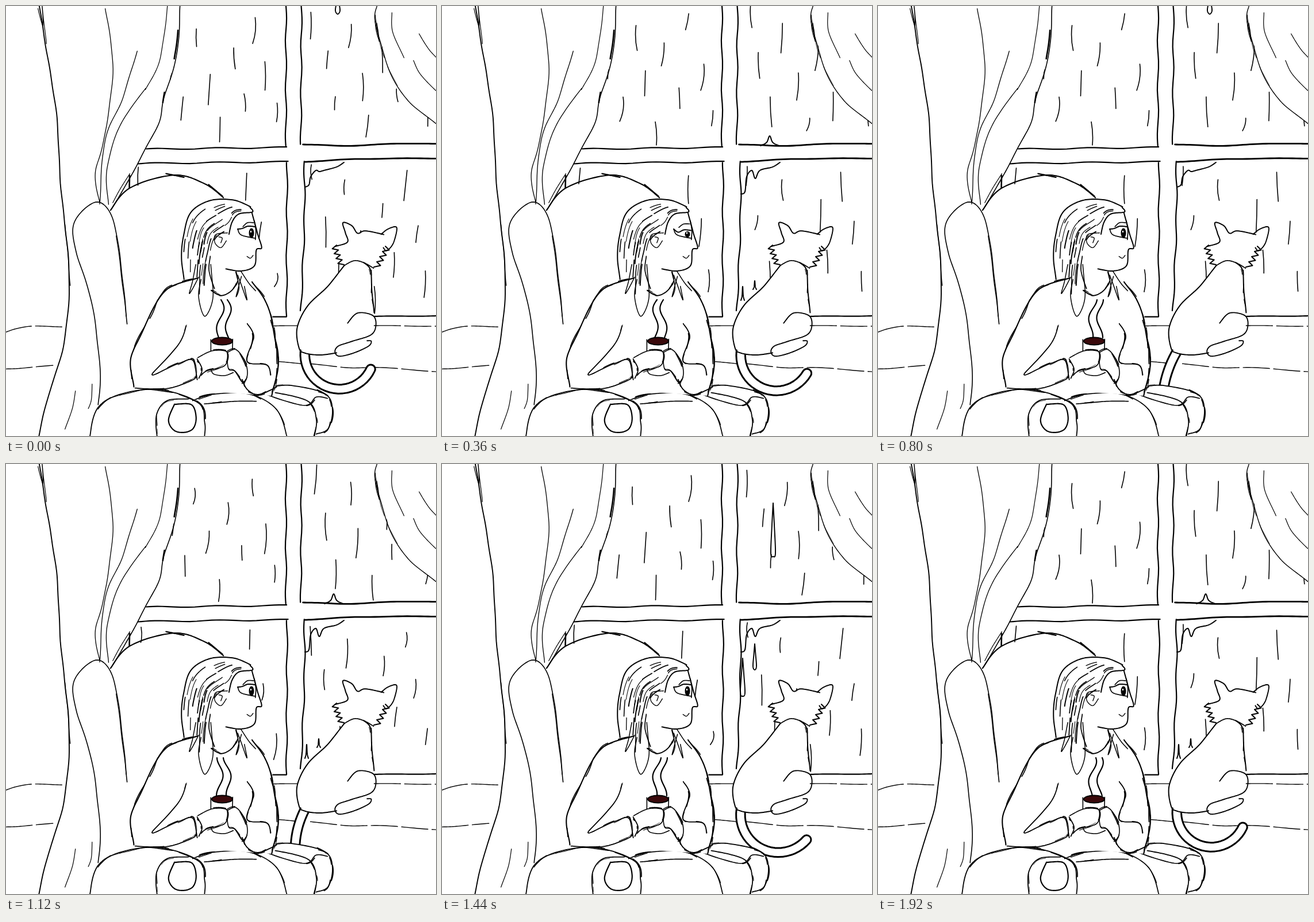
An HTML page with a canvas for the animation above (2 s loop, 748x748 px).

```html
<!DOCTYPE html>
<html lang="en">
<head>
<meta charset="utf-8">
<title>Rainy window</title>
<style>
html, body { margin: 0; width: 100%; height: 100%; overflow: hidden; background: #fff; }
canvas { display: block; }
</style>
</head>
<body>
<canvas id="stage" width="748" height="748"></canvas>
<script>
const SIZE = 748, LOOP = 2000, TAU = 2 * Math.PI;
const { sin, cos, floor, min, max } = Math;
const screen2d = document.getElementById('stage').getContext('2d');
let ctx = screen2d;

let seed = 7;
function rnd(lo = 0, hi = 1) {
  seed = (seed * 16807) % 2147483647;
  return lo + (hi - lo) * seed / 2147483647;
}

const points = s => s.trim().split(/\s+/).map(p => p.split(',').map(Number));
const mix = (a, b, f) => a + (b - a) * f;
const range = (n, f) => Array.from({ length: n }, (_, i) => f(i));

// Point at u (0 to 1) on a smooth curve through the key points.
function pointAt(p, u) {
  const n = p.length - 1, f = min(u * n, n - 1e-6), i = floor(f), t = f - i;
  const [a, b, c, d] = [-1, 0, 1, 2].map(k => p[max(0, min(n, i + k))]);
  return [0, 1].map(k => b[k] + t / 2 * (c[k] - a[k] + t * (2 * a[k] - 5 * b[k] + 4 * c[k] - d[k]
    + t * (3 * (b[k] - c[k]) + d[k] - a[k]))));
}

// Smooth path with a slow waver, like a hand-held pen.
function trace(p, wobble = 0, from = 0, to = 1) {
  const path = new Path2D(), steps = p.length * 12;
  const phase = wobble ? rnd(0, TAU) : 0;
  let run = 0, last;
  for (let i = 0; i <= steps; i++) {
    const [x, y] = pointAt(p, mix(from, to, i / steps));
    if (last) run += Math.hypot(x - last[0], y - last[1]);
    last = [x, y];
    path.lineTo(x + wobble * sin(run / 13 + phase), y + wobble * sin(run / 17 + 2 * phase));
  }
  return path;
}

function ink(path, width = 2) {
  ctx.lineWidth = width;
  ctx.stroke(path);
}

// Draws curves separated by "|"; loose adds short overlapping strokes.
function pen(s, width = 2, wobble = 0.4, loose = 0) {
  s.split('|').map(points).forEach(p => {
    ink(trace(p, wobble), width);
    for (let i = 0; i < loose * p.length; i++) {
      const from = rnd(0, 0.85);
      ink(trace(p, 1.6, from, from + rnd(0.06, 0.15)), rnd(0.8, 1.8));
    }
  });
}

function polygon(p) {
  const path = new Path2D();
  p.forEach(([x, y]) => path.lineTo(x, y));
  return path;
}

function mask(s) {
  ctx.fillStyle = '#fff';
  ctx.fill(polygon(points(s)));
}

function setInk() {
  ctx.strokeStyle = '#000';
  ctx.lineCap = ctx.lineJoin = 'round';
}

function layer(paint) {
  const canvas = document.createElement('canvas');
  canvas.width = canvas.height = SIZE;
  ctx = canvas.getContext('2d');
  setInk();
  paint();
  ctx = screen2d;
  return canvas;
}

// --- Still parts ---

function drawWindow() {
  pen('487,0 487,242|514,0 513,240|243,249 487,246|228,274 490,271|489,272 488,540|519,270 519,380 513,530', 2.2, 1.1);
  pen('464,541 488,541|640,540 748,539', 2.2);
  pen('517,241 600,243 690,239 748,240|520,271 620,266 748,265', 2.8);
  ctx.setLineDash([46, 7]);
  pen('0,567 20,561 50,557 103,558|0,631 30,630 82,625|463,557 508,556|640,556 748,557', 1.4);
  pen('475,619 515,622|530,622 590,629 650,629 748,636', 1.4);
  ctx.setLineDash([]);
}

function drawCurtains() {
  const edge = '303,0 297,85 275,160 265,205 232,268 205,318 182,355';
  mask(`0,0 ${edge} 95,350 89,220 66,40`);
  pen(edge, 1.6);
  pen('299,42 296,70 293,92|276,150 273,168|215,295 215,318', 2.6);
  pen('58,0 70,75 88,190 95,310 110,470 100,590 73,680 57,748', 1.9);
  pen('173,5 186,110 170,235 155,290 163,342|228,78 203,160 172,235 163,345|243,143 200,205 176,280 178,345', 1.3);
  pen('281,0 268,92 243,145|56,4 64,35 63,0 70,66|103,380 112,486|186,342 200,316 215,292', 1.2);
  pen('150,658 148,685 143,700|121,670 115,700 103,736', 1.2);

  const drape = '645,0 643,30 668,115 700,165 748,205';
  mask(`${drape} 748,0`);
  pen(drape, 1.4, 0.4, 1);
  pen('671,12 673,45 692,90|719,48 735,75 748,90|709,95 720,118 748,147', 1.2);
}

// Zigzag of fur from the top point to the bottom one.
function fur(x0, y0, x1, y1, reach) {
  ink(polygon(range(9, i => [mix(x0, x1, i / 8) + (i % 2 ? reach : 0), mix(y0, y1, i / 8) - (i % 2 ? 0 : 2)])), 2);
}

function drawCat() {
  const back = '588,452 560,487 525,522 506,560 510,595 520,604 545,607 575,603';
  const chest = '622,446 634,460 637,500 640,533';
  mask(`${back} 640,540 637,475 622,446`);
  mask('586,377 612,395 657,398 680,386 662,425 640,455 588,452 573,418');
  pen(back, 2);
  pen(chest, 2, 0.4, 1);
  pen('588,452 605,443 622,446 640,456', 1.7);
  pen('594,552 612,534 638,538 643,556 634,573 600,584 578,591 572,601 580,609 605,604 630,592 635,583 628,582', 1.9);
  pen('573,418 594,411 590,395 586,377 602,382 612,395 625,391 657,398', 2);
  pen('652,397 665,388 680,386 674,412 662,425 656,420', 1.9);
  fur(575, 418, 588, 452, -9);
  fur(660, 420, 640, 456, 9);
}

function drawChair() {
  const back = '182,355 215,317 290,294 345,309 378,333';
  mask(`${back} 330,560 200,560`);
  mask('440,672 470,661 500,660 535,667 555,675 567,690 568,715 540,748 440,748');
  pen(back, 2.1);
  pen('278,292 310,298|352,311 377,331', 2.2);
  pen('160,694 164,640 150,520 123,430 118,378 155,341 182,362 196,420 211,553', 1.6);
  pen('192,400 201,470 209,540', 1.2);
  pen('325,687 360,675 420,675 470,700 488,748|345,692 390,688 435,688|415,673 430,668 515,695 540,680 560,682', 1.7, 0.5, 1);
  pen('470,661 500,660 555,675 568,700 560,735 540,745|468,673 525,687 540,720 537,748', 1.8, 0.5, 1);
  pen('146,748 160,698 205,674 265,667 335,690 346,725 345,748|263,748 262,710 280,687 318,683', 1.8, 0.5, 1);
  pen('293,693 322,693 331,715 326,735 310,742 292,738 283,720 293,693', 2.2);
}

function drawHair() {
  const outer = points('425,350 395,337 355,338 322,360 308,400 306,440 309,476');
  const inner = points('425,357 400,362 390,385 365,405 357,435 350,470 346,520');
  ink(trace(outer, 0.7), 2);
  for (let i = 0; i < 34; i++) {
    const depth = rnd(0.05, 1), from = rnd(0.04, 0.8);
    const strand = outer.map((p, k) => [mix(p[0], inner[k][0], depth), mix(p[1], inner[k][1], depth)]);
    ink(trace(strand, 0.5, from, min(1, from + rnd(0.08, 0.2))), rnd(1, 2));
  }
  pen('330,450 325,478 319,500 335,472|339,475 335,505 346,540 360,505 356,450|400,463 405,490 400,505 410,470', 1.5);
  pen('403,468 419,511 415,488|409,462 422,482 434,495', 1.5);
}

function drawWoman() {
  const left = '333,474 280,492 250,540 218,612 222,662';
  const right = '428,480 450,510 466,565 473,630 462,678';
  mask('309,476 306,430 322,360 355,338 395,335 428,360 441,410 445,420 432,452 410,461 405,480 340,500');
  mask(`222,662 218,612 250,540 280,492 333,474 428,480 450,510 466,565 473,630 462,678`);
  pen(`${left}|${right}`, 2.1, 0.7, 2);
  pen('313,556 300,590 254,641 300,622 325,616 333,650|333,614 341,632 335,648', 1.8, 0.5, 1);
  pen('225,664 280,666 325,650 331,640|420,553 430,575 420,618 453,625 460,642', 1.8, 0.6, 1);
  pen('410,650 420,668 440,676 470,662|357,495 375,503 392,495 403,478', 1.9, 0.7, 2);
  pen('333,612 360,600 385,602 380,625 350,635 340,643', 1.6, 0.5, 1);
  pen('385,602 400,598 416,618 420,640 412,655 398,635 388,632 385,615', 1.6, 0.5, 1);
  pen('356,580 356,600|394,580 394,598|357,632 362,640 380,643 395,638', 1.6);
  pen('428,360 437,395 445,420 436,424 432,452 410,461 383,457', 2);
  pen('425,350 429,358 405,362 393,376 388,397', 2);
  pen('419,436 425,439 430,434|385,395 365,398 364,412 374,420 383,408|370,402 376,404 374,412', 1.4);
  pen('355,435 353,460 363,492|400,462 403,475|403,388 409,398 434,404|432,374 435,390 434,406', 1.7);
  drawHair();
}

// --- Moving parts ---

function makeRain() {
  const path = new Path2D();
  const panes = [[264, 0, 480, 242], [225, 272, 482, 535], [525, 0, 745, 238], [525, 268, 745, 535]];
  for (const [x0, y0, x1, y1] of panes) {
    for (let i = 0; i < 11; i++) {
      const x = mix(x0, x1, (i + rnd(0.2, 0.8)) / 11);
      const y = mix(y0, y1, (i * 0.382 % 1) * 0.85) + rnd(0, 15);
      const end = min(y1, y + rnd(22, 58));
      path.moveTo(x, y);
      path.quadraticCurveTo(x + rnd(-3, 4), (y + end) / 2, x + rnd(-6, 3), end);
    }
  }
  return path;
}

function drop(x, top, bottom, w) {
  ink(trace([[x, top], [x + w / 2, mix(top, bottom, 0.4)], [x + w, bottom - 6], [x, bottom],
    [x - w, bottom - 6], [x - w / 2, mix(top, bottom, 0.4)], [x, top]]), 1.9);
}

function splash(x, y, w, h) {
  ink(trace([[x - w, y], [x - w / 3, y - h / 3], [x, y - h], [x + w / 3, y - h / 3], [x + w, y]]), 2);
}

function drawDrips(t) {
  const phase = floor(t / 80) % 5, sag = 4 * min(phase, 3);
  const gutter = [[520, 315 + sag], [527, 311 + sag], [530, 297], [539, 286], [545, 288 + sag], [553, 286], [575, 280], [588, 272]];
  ink(trace(gutter), 2);
  if (phase < 3) drop(577, -20, 14 + 26 * phase, 4);
  if (phase === 3) {
    drop(576, 68, 161, 4);
    drop(523, 338, 404, 4);
    drop(544, 313, 358, 3);
  }
  if (phase === 4) {
    splash(570, 243, 16, 17);
    splash(523, 512, 3, 24);
    splash(544, 493, 3, 15);
  }
}

// The tail uncurls and swings left, then curls back.
function drawTail(t) {
  const swing = t > 280 && t < 1580 ? sin(Math.PI * (t - 280) / 1300) ** 2 : 0;
  const start = 95 + 28 * swing, turn = 160 - 120 * swing, steps = 24;
  let x = 520, y = 601;
  const spine = range(steps + 1, i => {
    const p = [x, y], heading = (start - turn * (i + 0.5) / steps) * TAU / 360;
    x += cos(heading) * 168 / steps;
    y += sin(heading) * 168 / steps;
    return p;
  });
  const path = polygon(spine);
  ink(path, 18.5);
  ctx.strokeStyle = '#fff';
  ink(path, 12.5);
  ctx.strokeStyle = '#000';
}

function drawSteam(t) {
  const rise = 0.75 + floor(t / 76) / 8;
  for (const [base, lean] of [[370, 4], [387, -2]]) {
    ink(polygon(range(23, i => {
      const v = i / 22;
      return [base + lean * v + (4 + 3 * v) * cos(TAU * (v - rise)), 577 - 66 * v];
    })), 2.2);
  }
  const coffee = new Path2D();
  coffee.ellipse(376, 583, 18, 6.5, 0, 0, TAU);
  ctx.fillStyle = '#3a090b';
  ctx.fill(coffee);
  ink(coffee, 2);
}

function drawEye(t) {
  const shut = max(0, 1 - Math.abs(t - 420) / 100);
  const lid = y => y + 16 * shut;
  ink(trace([[403, 388], [411, lid(387)], [421, lid(383)], [433, lid(384)]]), 2);
  ink(trace([[412, 384 + 3 * shut], [420, 377 + 6 * shut], [431, 377 + 5 * shut]]), 1.6);
  ctx.fillStyle = '#000';
  ctx.beginPath();
  ctx.ellipse(427, 395 + 5 * shut, 4.5, 8 * (1 - shut) + 0.5, 0, 0, TAU);
  ctx.fill();
  ctx.fillStyle = '#fff';
  if (shut < 0.5) ctx.fillRect(425, 391 + 6 * shut, 2, 3);
}

const back = layer(drawWindow);
const front = layer(() => [drawCurtains, drawCat, drawChair, drawWoman].forEach(paint => paint()));
const rain = range(3, makeRain);

function draw(t) {
  ctx.fillStyle = '#fff';
  ctx.fillRect(0, 0, SIZE, SIZE);
  setInk();
  ctx.drawImage(back, 0, 0);
  ink(rain[floor(t / 76) % 3], 1.6);
  drawDrips(t);
  drawTail(t);
  ctx.drawImage(front, 0, 0);
  drawSteam(t);
  drawEye(t);
}

const begin = performance.now();
function tick() {
  const t = (performance.now() - begin) % LOOP;
  draw(floor(t / 40) * 40);
  requestAnimationFrame(tick);
}
tick();
</script>
</body>
</html>
```
